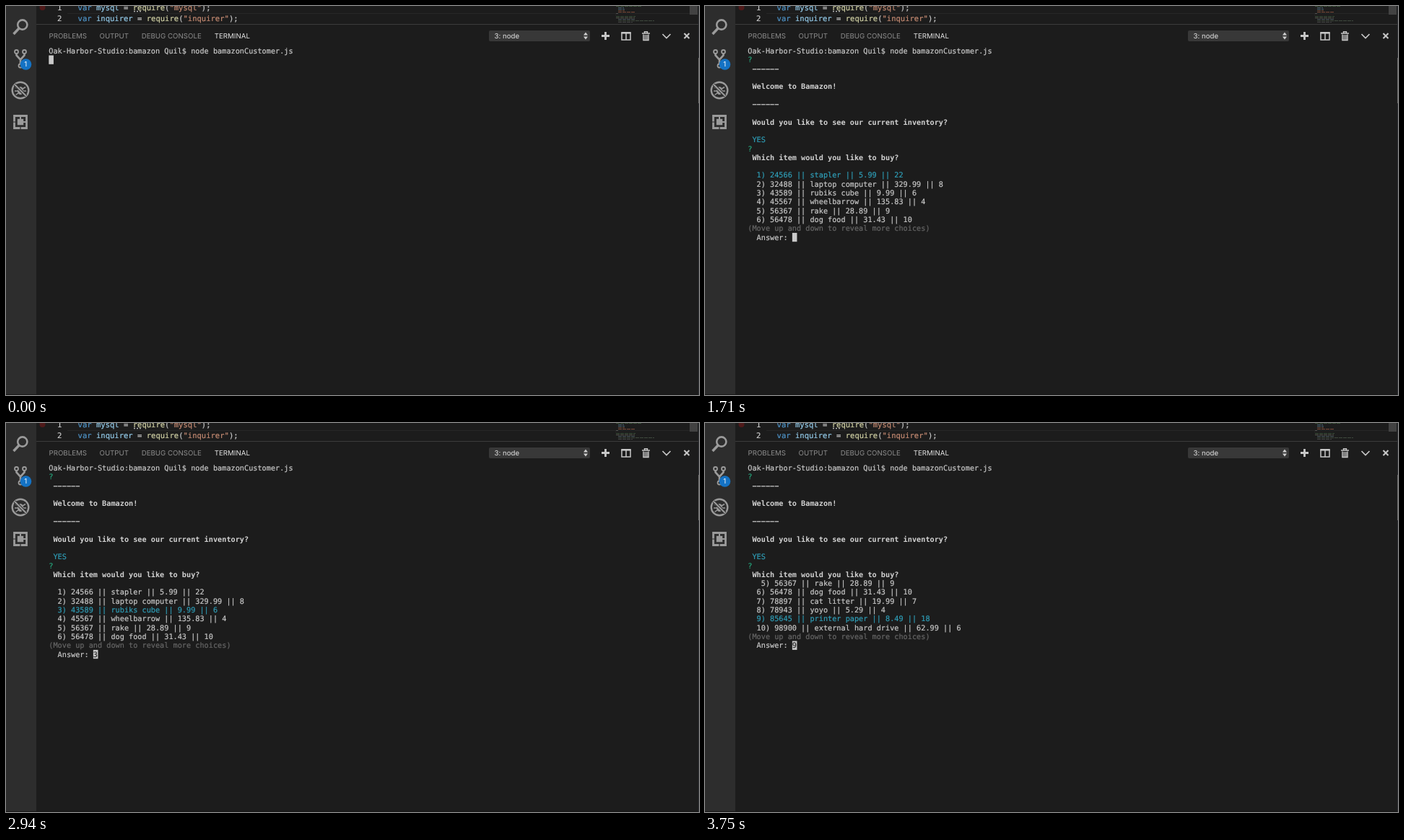
An HTML page for the animation above (3780 ms loop, 960 px wide and 540 px high).

```html
<!DOCTYPE html>
<html lang="en">
<head>
<meta charset="utf-8">
<title>Terminal</title>
<style>
  html, body { margin: 0; width: 100%; height: 100%; overflow: hidden; background: #1c1c1c; }
  svg { display: block; width: 960px; height: 540px; }
  text { white-space: pre; text-rendering: geometricPrecision; }
  .mono { font-family: "DejaVu Sans Mono", monospace; }
  .mono text, .mono tspan { fill: currentColor; stroke: currentColor; stroke-width: .2px; }
  .code { font-size: 10.54px; color: #c8c8c8; }
  .kw { color: #4f94c8; }
  .name { color: #94cbea; }
  .fn { color: #d0d0a4; }
  .str { color: #c48a72; }
  .ui { font: 9.7px Inter, sans-serif; fill: #8c8c8c; }
  .ui .on { fill: #e2e2e2; }
  #term { font-size: 10.22px; color: #c8c8c8; }
  #term .bold { font-weight: bold; color: #d2d2d2; stroke: none; }
  #term .cyan { color: #2f9db6; }
  #term .green { color: #25a67c; }
  #term .dim { color: #666; }
  #term .under { color: #2a2a2a; }
  .icon { fill: none; stroke: #c8c8c8; }
  .side { fill: none; stroke: #9b9b9b; }
</style>
</head>
<body>
<svg viewBox="0 0 960 540">
  <rect width="960" height="540" fill="#1c1c1c"/>

  <!-- editor strip -->
  <path d="M85 10.5H947" stroke="#272727"/>
  <circle cx="50.5" cy="2" r="4" fill="#501a1a"/>
  <g class="mono code">
    <text x="71" y="5.8">1</text>
    <text x="71" y="21.4">2</text>
    <text x="99.6" y="5.8"><tspan class="kw">var</tspan> <tspan class="name">mysql</tspan> = <tspan class="fn">require</tspan>(<tspan class="str">"mysql"</tspan>);</text>
    <text x="99.6" y="21.4"><tspan class="kw">var</tspan> <tspan class="name">inquirer</tspan> = <tspan class="fn">require</tspan>(<tspan class="str">"inquirer"</tspan>);</text>
  </g>
  <path d="M177 7.5h10" stroke="#b5b5b5" stroke-width="1.4" stroke-dasharray="2 2"/>
  <g id="map"></g>
  <rect x="947" width="11" height="12" fill="#424242"/>
  <path d="M42 25.5H959" stroke="#3c3c3c"/>

  <!-- panel header -->
  <g class="ui">
    <text x="59.5" y="45">PROBLEMS</text>
    <text x="129.5" y="45">OUTPUT</text>
    <text x="187.7" y="45">DEBUG CONSOLE</text>
    <text x="288.8" y="45" class="on">TERMINAL</text>
    <rect x="669" y="34" width="140" height="15" rx="2" fill="#383838"/>
    <text x="676.5" y="45" class="on">3: node</text>
  </g>
  <path d="M800 40.5l3-4 3 4zM800 42.5l3 4 3-4z" fill="#d0d0d0"/>
  <g class="icon">
    <path d="M825 41.5h11M830.5 36v11" stroke-width="2.8"/>
    <path d="M853 37.5h12v9.5h-12zM859 37v10" stroke-width="1.5"/>
    <path d="M852.3 37.2h13.4" stroke-width="2.4"/>
    <path d="M881 38h11M884.5 37.5v-1.8h4v1.8" stroke-width="1.4"/>
    <path d="M883 39.5v8h7v-8M885.4 40v7M887.8 40v7" stroke-width="1.5"/>
    <path d="M909.5 39l5.5 5.5 5.5-5.5" stroke-width="1.7"/>
    <path d="M939.5 38l7 7M946.5 38l-7 7" stroke-width="2.1"/>
  </g>

  <!-- activity bar -->
  <rect width="42" height="540" fill="#2d2d2d"/>
  <g class="side">
    <circle cx="22.8" cy="26" r="6.6" stroke-width="2.6"/>
    <path d="M18 31l-7.500 8" stroke-width="3.400"/>
    <circle cx="14.500" cy="63.500" r="2.500" stroke-width="1.800"/>
    <circle cx="25.500" cy="63.500" r="2.500" stroke-width="1.800"/>
    <circle cx="20" cy="83" r="2.500" stroke-width="1.800"/>
    <path d="M14.500 66v2.500l5.500 6v6M25.500 66v2.500l-5.500 6" stroke-width="2.600"/>
    <circle cx="20" cy="117" r="11.300" stroke-width="2.400"/>
    <ellipse cx="20" cy="117.500" rx="4" ry="5.500" fill="#9b9b9b" stroke="none"/>
    <path d="M13 112.500l4 2.500M12 118h5M13.500 123.500l4-3M27 112.500l-4 2.500M28 118h-5M26.500 123.500l-4-3" stroke-width="1.500"/>
    <path d="M12 109l16 16" stroke="#2d2d2d" stroke-width="4"/>
    <path d="M12 109l16 16" stroke-width="2.200"/>
    <path d="M11.500 152.500h17v17h-17z" stroke-width="2.800"/>
    <rect x="15.800" y="156.800" width="8.400" height="8.400" fill="#9b9b9b" stroke="none"/>
    <path d="M20 153v5M23 161h5" stroke-width="2"/>
    <path d="M10 161h3M20 168v3" stroke="#2d2d2d" stroke-width="1.200"/>
  </g>
  <circle cx="27.500" cy="81" r="7.800" fill="#1472c4"/>
  <text class="ui" x="27.300" y="84.400" text-anchor="middle" style="fill:#fff">1</text>

  <!-- window edges -->
  <path d="M0 539.500H960" stroke="#171717"/>
  <path d="M959.500 0V540" stroke="#2b2d30"/>
  <path d="M959.500 72V135" stroke="#6a6a6a"/>

  <g id="term" class="mono"></g>
</svg>
<script>
const LOOP = 3780, PROMPT = 30, LIST = 1230;
const FIRST_MOVE = 2685, MOVE = 142;
const LEFT = 59.3, BASE = 66, CELL = 6.155, ROW = 12.32, PAGE = 7;

const items = [
  '24566 || stapler || 5.99 || 22',
  '32488 || laptop computer || 329.99 || 8',
  '43589 || rubiks cube || 9.99 || 6',
  '45567 || wheelbarrow || 135.83 || 4',
  '56367 || rake || 28.89 || 9',
  '56478 || dog food || 31.43 || 10',
  '78897 || cat litter || 19.99 || 7',
  '78943 || yoyo || 5.29 || 4',
  '85645 || printer paper || 8.49 || 18',
  '98900 || external hard drive || 62.99 || 6'
].map((item, i) => `  ${i + 1}) ${item}`);

const command = ['Oak-Harbor-Studio:bamazon Quil$ node bamazonCustomer.js'];
const rule = [' \u2212\u2212\u2212\u2212\u2212\u2212', 'bold'];
const gap = [''];
const greeting = [
  command, ['?', 'green'], rule, gap,
  [' Welcome to Bamazon!', 'bold'], gap, rule, gap,
  [' Would you like to see our current inventory?', 'bold'], gap
];
const ask = [
  [' (Use arrow keys)', 'dim'], ['\u276f YES', 'cyan'], ['  NO']
];

const svg = 'http://www.w3.org/2000/svg';
const term = document.getElementById('term');

function add(parent, tag, attrs, text = '') {
  const el = document.createElementNS(svg, tag);
  for (const key in attrs) el.setAttribute(key, attrs[key]);
  el.textContent = text;
  parent.append(el);
}

function write(text, cls, row, col = 0) {
  add(term, 'text', { x: LEFT + col * CELL, y: BASE + row * ROW, class: cls }, text);
}

function cursor(row, col, under = '') {
  add(term, 'rect', {
    x: LEFT + col * CELL, y: BASE + row * ROW - 9.8,
    width: 6.6, height: 12.3, fill: '#cacaca'
  });
  write(under, 'under', row, col);
}

// The choices start with a blank line; the page scrolls once the fifth is picked.
function page(picked) {
  const top = Math.max(0, picked - 4);
  const lines = ['', ...items].slice(top, top + PAGE);
  return lines.map((line, i) =>
    [(i ? '' : ' ') + line, top + i === picked ? 'cyan' : '']);
}

// -2: command only, -1: first question, 1 and up: picked item
function stateAt(t) {
  if (t < PROMPT) return -2;
  if (t < LIST) return -1;
  if (t < FIRST_MOVE) return 1;
  return Math.min(9, 2 + Math.floor((t - FIRST_MOVE) / MOVE));
}

function draw(state) {
  term.replaceChildren();
  let lines = [command];
  if (state === -1) lines = [...greeting, ...ask];
  if (state > 0) {
    lines = [
      ...greeting, [' YES', 'cyan'], ['?', 'green'],
      [' Which item would you like to buy?', 'bold'],
      ...page(state),
      ['(Move up and down to reveal more choices)', 'dim'], ['  Answer: ']
    ];
  }
  lines.forEach(([text, cls = ''], row) => text && write(text, cls, row));
  if (state === -2) cursor(1, 0);
  if (state > 0) cursor(lines.length - 1, 10, state > 1 ? String(state) : '');
}

// Minimap: indent, width and colour of each tiny line
const map = document.getElementById('map');
[
  [1, 36, '#3a4f38'], [4, 8, '#47606e'], [4, 9, '#47606e'], [4, 9, '#6b4c3d'],
  [4, 24, '#7a4a38'], [1, 3, '#555'], [0, 0, '#555'], [1, 27, '#3a4f38'],
  [1, 26, '#55554c'], [4, 24, '#4a565c'], [4, 50, '#3f4a3e'], [4, 20, '#444']
].forEach(([x, width, fill], i) => {
  add(map, 'path', {
    d: `M${844 + x} ${i * 2 + 0.5}h${width}`, stroke: fill, 'stroke-dasharray': '5 1'
  });
});

const start = performance.now();
let shown;
function tick() {
  const state = stateAt((performance.now() - start) % LOOP);
  if (state !== shown) draw(shown = state);
  requestAnimationFrame(tick);
}
tick();
</script>
</body>
</html>
```
